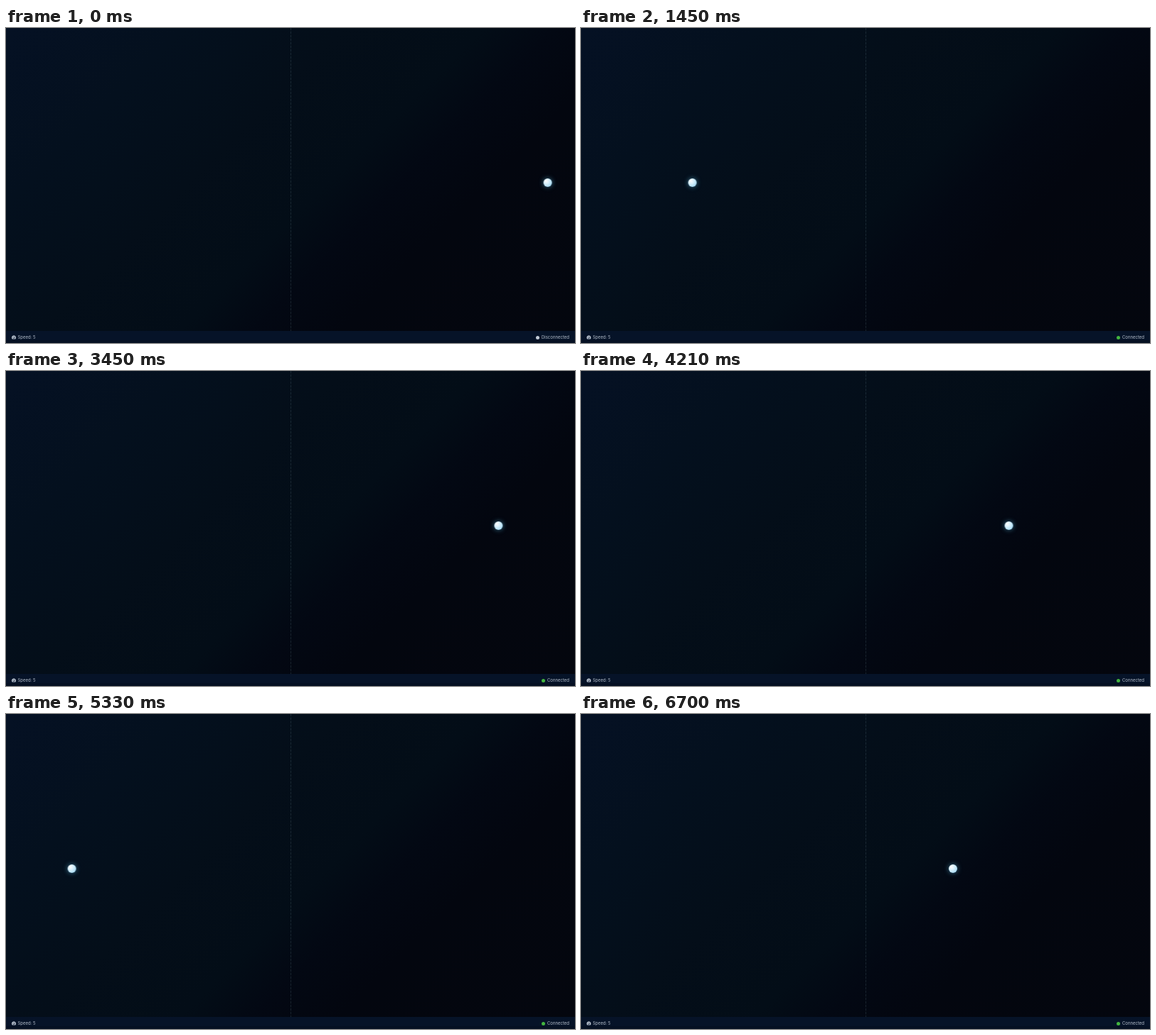
Write an HTML page that moves like this. It is 800 px wide and 444 px high and loops after 6730 ms.

```html
<!DOCTYPE html>
<html lang="en">
<head>
<meta charset="utf-8">
<title>Bouncing ball</title>
<style>
  :root { --loop: 6730ms; }

  html, body { margin: 0; width: 100%; height: 100%; overflow: hidden; background: #03060f; }

  .stage {
    position: relative;
    width: 800px;
    height: 444px;
    overflow: hidden;
    background: linear-gradient(135deg,
      #051124 0%, #04101e 20%, #040e19 38%, #030d17 54%, #030813 62%, #03060f 72%, #04060e 100%);
  }

  .net {
    position: absolute;
    left: 400px;
    top: 0;
    width: 1px;
    height: 427px;
    background: repeating-linear-gradient(rgba(150, 190, 200, .15) 0 3px, rgba(150, 190, 200, .04) 3px 5px);
  }

  .ball {
    position: absolute;
    left: -6px;
    top: 212px;
    width: 12px;
    height: 12px;
    border-radius: 50%;
    background: radial-gradient(circle at 32% 30%, #fff 0%, #d3effc 40%, #8fd0f0 100%);
    box-shadow: 0 0 7px rgba(90, 185, 225, .6);
    animation: bounce var(--loop) linear infinite;
  }

  /* Walls sit one radius inside the stage: 6px and 794px. */
  @keyframes bounce {
    0%      { transform: translateX(762px); }
    21.545% { transform: translateX(157px); }
    27.073% { transform: translateX(6px); }
    37.444% { transform: translateX(289px); }
    51.263% { transform: translateX(692px); }
    55.186% { transform: translateX(794px); }
    62.556% { transform: translateX(602px); }
    79.198% { transform: translateX(93px); }
    82.125% { transform: translateX(6px); }
    99.554%, 100% { transform: translateX(523px); }
  }

  .bar {
    position: absolute;
    left: 0;
    top: 427px;
    width: 800px;
    height: 17px;
    background: linear-gradient(#061328 0 13px, #051022 13px);
    color: #b4becb;
    font: 6px/18px Inter, "Open Sans", sans-serif;
    white-space: nowrap;
  }

  .gauge { position: absolute; left: 8px; top: 6px; width: 6px; height: 6px; }
  .speed { position: absolute; left: 16.4px; }

  .status {
    position: absolute;
    right: 8px;
    display: flex;
    align-items: center;
    gap: 3px;
    animation: var(--loop) step-end infinite;
  }
  .status::before {
    content: "";
    width: 5px;
    height: 5px;
    border-radius: 50%;
    background: currentColor;
  }
  .off { animation-name: hide; }
  .off::before { background: #c3ccd7; }
  .on { animation-name: show; }
  .on::before { background: #43b53f; }

  @keyframes hide { 0% { opacity: 1; } 14.86%, 100% { opacity: 0; } }
  @keyframes show { 0% { opacity: 0; } 14.86%, 100% { opacity: 1; } }
</style>
</head>
<body>
<div class="stage">
  <div class="net"></div>
  <div class="ball"></div>
  <div class="bar">
    <svg class="gauge" viewBox="0 0 12 12">
      <path d="M1.6 10.8A6 6 0 1 1 10.4 10.8Z" fill="#b4becb"/>
      <g fill="#061328">
        <circle cx="2.6" cy="7" r=".8"/>
        <circle cx="6" cy="3" r=".8"/>
        <circle cx="9.4" cy="7" r=".8"/>
        <circle cx="6" cy="8.6" r="1.3"/>
      </g>
      <path d="M6 8.6 8 4.4" stroke="#061328" stroke-width="1"/>
    </svg>
    <span class="speed">Speed: 5</span>
    <span class="status off">Disconnected</span>
    <span class="status on">Connected</span>
  </div>
</div>
</body>
</html>
```
